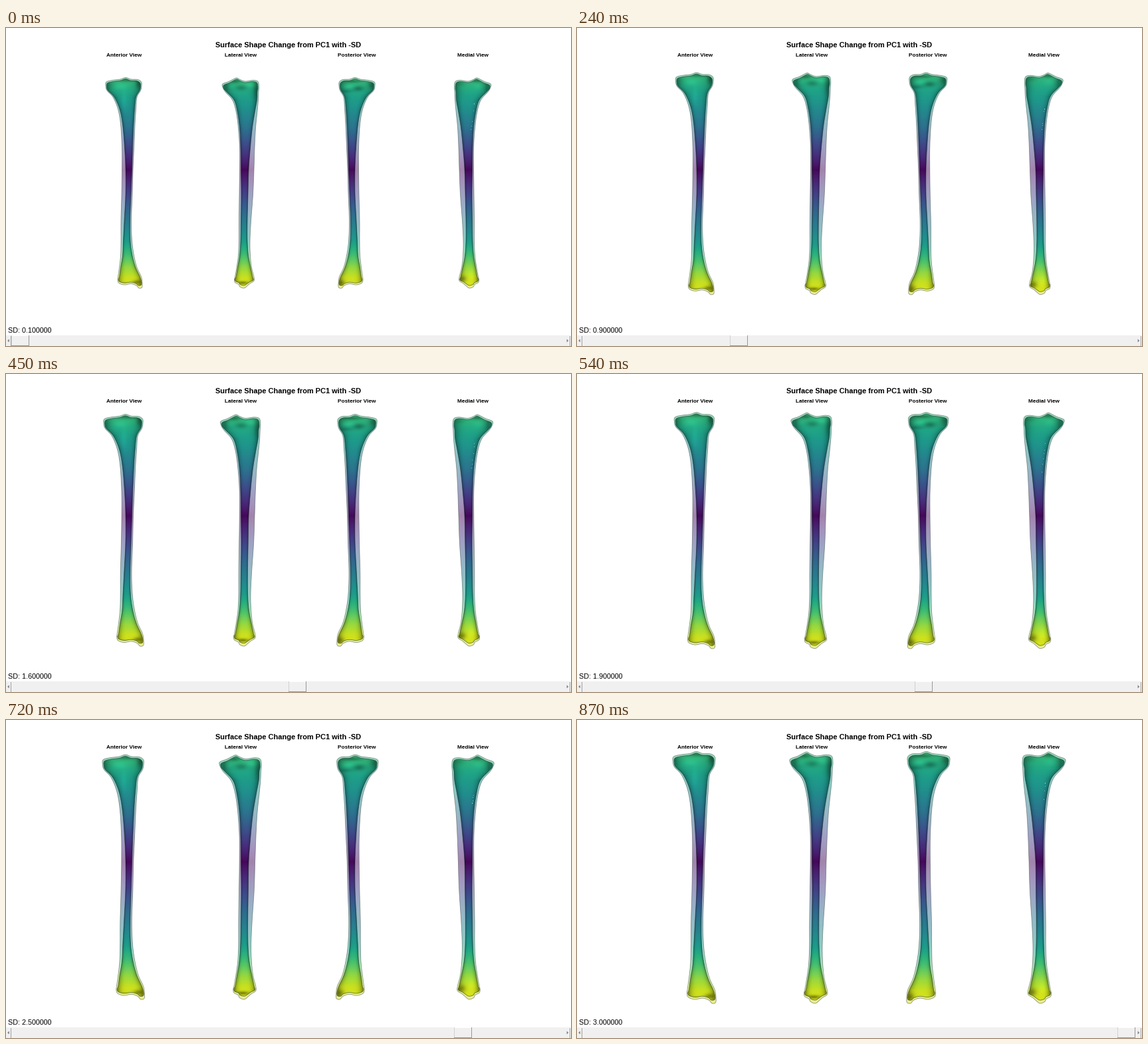
Animation, 850 px wide and 478 px high, one loop 0.9 s. Source, as a matplotlib script:

```python
import numpy as np
import matplotlib
import matplotlib.pyplot as plt
from matplotlib.animation import FuncAnimation
from matplotlib.patches import PathPatch, Polygon, Rectangle
from matplotlib.path import Path

W, H, DPI = 850, 478, 64
FRAMES, STEP = 30, 30
MID = 213          # height of the narrowest point of the shaft
GROW = 0.196       # growth in length over one loop

plt.rcParams["toolbar"] = "None"
fig = plt.figure(figsize=(W / DPI, H / DPI), dpi=DPI, facecolor="white")
ax = fig.add_axes([0, 0, 1, 1])
ax.set(xlim=(0, W), ylim=(H, 0))
ax.axis("off")


def px(size):
    return size * 72 / DPI


def label(x, y, text, size, ha="center", weight="bold"):
    return ax.text(x, y, text, fontsize=px(size), ha=ha, va="baseline",
                   weight=weight, family="Liberation Sans", color="black")


# Rows: y, outer left, inner left, inner right, outer right
FRONT = dict(
    axis=182.5,
    rows=np.array([
        (94, 152, 153.5, 201, 202.5), (104, 161, 163, 195.5, 197),
        (122, 168.5, 171, 193.5, 195.5), (145, 172.5, 175.5, 192, 194),
        (180, 174.5, 178.5, 190.5, 192.5), (213, 174.5, 180, 189.5, 191),
        (250, 174, 180, 188, 190), (290, 173, 178, 186.5, 188.5),
        (320, 173, 176.5, 187, 189.5), (342, 172.5, 175.5, 190, 192.5),
        (360, 170.5, 172.5, 195, 197), (374, 168.5, 170.5, 201.5, 203.5)]),
    head=np.array([
        (150, 87), (151, 81), (160, 78.5), (172, 77), (180, 74.5),
        (188, 77), (198, 77.5), (203.5, 81), (204, 87)]),
    foot=np.array([
        (205, 384), (204.5, 390), (200, 391), (196, 387), (188, 384.5),
        (178, 386), (170, 383.5), (168, 379)]))

SIDE = dict(
    axis=355,
    rows=np.array([
        (96, 330, 332, 378, 380), (108, 340.5, 343, 377.5, 379.5),
        (125, 346, 348, 374.5, 378), (150, 349.5, 351.5, 370.5, 375.5),
        (180, 351.5, 353, 367.5, 374), (213, 351.5, 353.5, 365, 373),
        (250, 351, 354, 364, 371.5), (290, 350.5, 353.5, 363, 368.5),
        (320, 350.5, 353, 363, 367), (342, 349.5, 351.5, 364.5, 367.5),
        (360, 347, 348.5, 368, 369.5), (374, 344.5, 346, 371, 373)]),
    head=np.array([
        (326, 89), (326, 84), (335, 80.5), (342, 77), (347, 75),
        (352, 77.5), (360, 80), (372, 78.5), (379, 80.5), (380.5, 88)]),
    foot=np.array([
        (373, 380), (367, 384), (363, 387.5), (358, 391), (352, 389),
        (350, 385.5), (344.5, 382.5), (343.5, 378)]))

# Bone, mirror sum (None keeps the side), soft spots: x, y, rx, ry, strength
VIEWS = [
    (FRONT, None, [(183, 78, 18, 3, -.3), (172, 88, 10, 5, .1),
                   (199, 83, 4, 7, -.2), (178, 108, 4, 14, .08),
                   (196, 382, 6, 3, -.3), (180, 384, 9, 2, -.2)]),
    (SIDE, None, [(345, 80, 8, 3, -.3), (354, 90, 8, 4, -.22),
                  (368, 86, 8, 4, .12), (338, 88, 6, 4, .08),
                  (376, 94, 4, 14, -.15), (356, 383, 9, 2.5, -.4)]),
    (FRONT, 705, [(520, 80, 15, 2.5, -.3), (516, 88, 10, 3, .12),
                  (530, 91, 8, 4, -.3), (512, 95, 10, 2.5, -.15),
                  (549, 85, 5, 5, -.12), (506, 383, 5, 4, -.2)]),
    (SIDE, 1055, [(708, 79, 10, 3, -.3), (684, 83, 8, 4, -.12),
                  (712, 88, 9, 5, .08), (688, 377, 5, 5, -.28),
                  (701, 370, 6, 9, .06)]),
]

# Colour scale position along the bone
SCALE_Y = [74, 90, 105, 120, 150, 180, 213, 250, 280, 300, 320, 340, 360, 375, 391]
SCALE_V = [.69, .62, .56, .51, .38, .2, .02, .2, .36, .45, .55, .69, .84, .92, .95]


def stretch(x, y, axis, p, waist):
    """Widen x around the axis; the waist widens less than the ends."""
    w = waist + (1 - waist) * np.clip(np.abs(y - MID) / 130, 0, 1)
    return axis + (x - axis) * (1 + .18 * p * w)


def smooth(pts, n=6):
    """Closed Catmull-Rom curve."""
    a, b, c, d = (np.roll(pts, k, axis=0)[:, None] for k in (1, 0, -1, -2))
    t = np.linspace(0, 1, n, endpoint=False)[None, :, None]
    out = .5 * (2 * b + (c - a) * t + (2 * a - 5 * b + 4 * c - d) * t ** 2
                + (3 * b - a - 3 * c + d) * t ** 3)
    return out.reshape(-1, 2)


def outline(bone, mirror, p, inner):
    y, ol, il, ir, orr = bone["rows"].T
    left, right = (il, ir) if inner else (ol, orr)
    head, foot = bone["head"].copy(), bone["foot"].copy()
    if inner:
        for part in (head, foot):
            m = (part[:, 0].min() + part[:, 0].max()) / 2
            part[:, 0] = m + (part[:, 0] - m) * .94
        head[:, 1] += 2
        foot[:, 1] = 375 + (foot[:, 1] - 375) * .75
    pts = np.vstack([head, np.c_[right, y], foot, np.c_[left, y][::-1]])
    pts = smooth(pts)
    x = stretch(pts[:, 0], pts[:, 1], bone["axis"], p, 0 if inner else .6)
    if mirror:
        x = mirror - x
    return np.c_[x, MID + (pts[:, 1] - MID) * (1 + GROW * p)]


def compound(p, inner):
    return Path.make_compound_path(*[
        Path(np.vstack([o, o[:1]]), closed=True)
        for o in (outline(b, m, p, inner) for b, m, _ in VIEWS)])


def base_rows(p):
    return MID + (np.arange(H) + .5 - MID) / (1 + GROW * p)


def row_colours(y):
    return matplotlib.colormaps["viridis"](np.interp(y, SCALE_Y, SCALE_V))[:, :3]


def shaded(p):
    y = base_rows(p)
    base = row_colours(y)
    img = np.ones((H, W, 3))
    for bone, mirror, spots in VIEWS:
        axis = mirror - bone["axis"] if mirror else bone["axis"]
        x0, x1 = int(axis) - 50, int(axis) + 50
        cols = np.arange(x0, x1) + .5
        ry, _, il, ir, _ = bone["rows"].T
        lo = stretch(np.interp(y, ry, il), y, bone["axis"], p, 0)
        hi = stretch(np.interp(y, ry, ir), y, bone["axis"], p, 0)
        if mirror:
            lo, hi = mirror - hi, mirror - lo
        t = (2 * cols[None] - lo[:, None] - hi[:, None]) / (hi - lo)[:, None]
        light = 1 - .36 * np.clip(np.abs(t), 0, 1) ** 3.5
        bx = axis + (cols - axis) / (1 + .18 * p)
        for sx, sy, rx, r_y, k in spots:
            light += k * np.exp(-((bx[None] - sx) / rx) ** 2
                                - ((y[:, None] - sy) / r_y) ** 2)
        img[:, x0:x1] = np.clip(base[:, None] * light[..., None], 0, 1)
    return img


label(425, 29, "Surface Shape Change from PC1 with -SD", 11.05)
for x, name in zip((177.5, 353, 527.7, 702.7),
                   ("Anterior", "Lateral", "Posterior", "Medial")):
    label(x, 43, name + " View", 8.2)
readout = label(3, 458.5, "", 10.7, ha="left", weight="normal")

# Bones
extent = (0, W, H, 0)
veil = ax.imshow(np.ones((H, 1, 3)), extent=extent, aspect="auto",
                 interpolation="nearest", zorder=1)
body = ax.imshow(np.ones((H, W, 3)), extent=extent, aspect="auto",
                 interpolation="nearest", zorder=3)
rim = ax.add_patch(PathPatch(compound(0, False), fill=False, lw=px(.9),
                             ec="#50605c", alpha=.6, zorder=2))
edge = ax.add_patch(PathPatch(compound(0, True), fill=False, lw=px(.9),
                              ec="#10282c", alpha=.55, zorder=4))
glints, = ax.plot([], [], ls="", marker="s", ms=px(1), mew=0,
                  color="#8fd0d0", alpha=.8, zorder=5)

# Scroll bar
ax.add_patch(Rectangle((0, 462), 849, 16, fc="#f0f0f0", lw=0, zorder=5))
for x, d in ((2.2, 1), (846.2, -1)):
    ax.add_patch(Polygon([(x, 470), (x + 2.6 * d, 467.5), (x + 2.6 * d, 472.5)],
                         fc="#808080", lw=0, zorder=6))
for x in (7, 848):
    ax.add_patch(Rectangle((x, 463), 1, 15, fc="#a0a0a0", lw=0, zorder=6))

THUMB = [(0, 462, 27, 16, "#f0f0f0"), (0, 462, 27, 1, "#fcfcfc"),
         (0, 462, 1, 16, "#d0d0d0"), (26, 462, 1, 16, "#989898"),
         (0, 477, 27, 1, "#989898")]
thumb = [ax.add_patch(Rectangle((dx, y), w, h, fc=c, lw=0, zorder=7))
         for dx, y, w, h, c in THUMB]
ax.set(xlim=(0, W), ylim=(H, 0))


def update(i):
    p = i / (FRAMES - 1)
    outer, inner = compound(p, False), compound(p, True)
    veil.set_data((.5 + .5 * row_colours(base_rows(p)))[:, None])
    veil.set_clip_path(outer, ax.transData)
    body.set_data(shaded(p))
    body.set_clip_path(inner, ax.transData)
    rim.set_path(outer)
    edge.set_path(inner)

    rng = np.random.default_rng(i)
    gy = rng.uniform(112, 155, 6)
    glints.set_data(np.floor(705 - (gy - 112) * .13) + .5,
                    np.floor(MID + (gy - MID) * (1 + GROW * p)) + .5)

    readout.set_text(f"SD: {(i + 1) / 10:.6f}")
    left = round(8 + 27.77 * i)
    for part, spec in zip(thumb, THUMB):
        part.set_x(left + spec[0])
    return veil, body, rim, edge, glints, readout, *thumb


anim = FuncAnimation(fig, update, frames=FRAMES, interval=STEP,
                     repeat=True, repeat_delay=0, blit=False)
plt.show()
```
